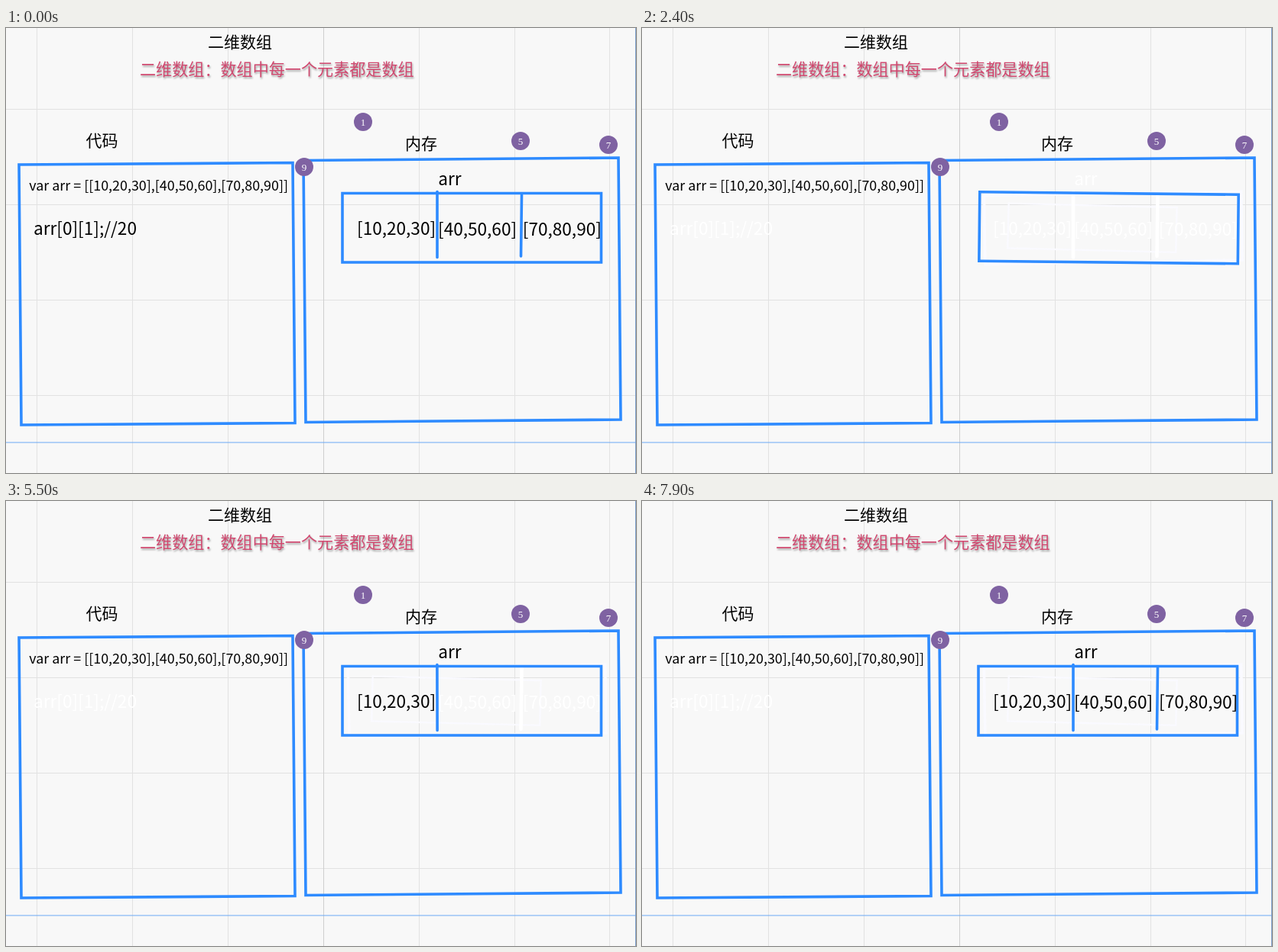
These frames come from a looping animation (824 px wide and 583 px high, 8 s). An HTML page:

```html
<!DOCTYPE html>
<html lang="zh">
<head>
<meta charset="utf-8">
<style>
html, body { margin: 0; width: 100%; height: 100%; overflow: hidden; background: #f8f8f8; }
svg { display: block; width: 824px; height: 583px; }
text { font-family: "Noto Sans CJK SC", "Noto Sans CJK", "Noto Sans", sans-serif; font-size: 21px; white-space: pre; }
.code { font-size: 22.6px; }
.small { font-size: 17.9px; }
.note { fill: #d0486f; font-size: 21.1px; filter: drop-shadow(1px 2px 1px rgba(0,0,0,.35)); }
.badge text { font: 13px "Liberation Serif", serif; fill: #fff; text-anchor: middle; }
.badge circle { fill: #7f62a2; }
.line { fill: none; stroke: #2e8bff; stroke-width: 3.6; }
.round { stroke-linecap: round; }
.blank text { fill: #fff; }
.blank .line { stroke: #fff; stroke-width: 4.6; }
#trace .line { stroke: #fafaff; }
</style>
</head>
<body>
<svg viewBox="0 0 824 583">
  <rect width="824" height="583" fill="#f8f8f8"/>
  <g id="grid" shape-rendering="crispEdges"></g>
  <path d="M0 543H824" stroke="#6aa8f4"/>
  <path d="M823.5 0V583" stroke="#7a9cc8"/>
  <text x="264" y="26">二维数组</text>
  <text class="note" x="175" y="62">二维数组：数组中每一个元素都是数组</text>
  <text x="104.5" y="155">代码</text>
  <text x="522" y="159">内存</text>
  <g id="trace"></g>
  <g id="blank" class="blank"></g>
  <path class="line" d="M17 179L375 176.5L378 517.5L20 520Z"/>
  <path class="line" d="M389 173.5L801 170L804 513L392 516.5Z"/>
  <g id="live"></g>
  <g id="badges" class="badge"></g>
</svg>
<script>
const $ = id => document.getElementById(id);
const LOOP = 8000, CLEAR = 1200, STEP = 100, SETTLE = 9;
const FIRST = 2300, GAP = 900;

function add(parent, tag, attrs, text = '') {
  const el = document.createElementNS('http://www.w3.org/2000/svg', tag);
  for (const key in attrs) el.setAttribute(key, attrs[key]);
  el.textContent = text;
  parent.append(el);
  return el;
}

const gridLine = (x, y, width, height, fill = '#e2e2e2') =>
  add($('grid'), 'rect', { x, y, width, height, fill });
for (let x = 40; x < 824; x += 124.9) gridLine(Math.round(x), 0, 1, 583);
for (let y = 106; y < 583; y += 125) gridLine(0, y, 824, 1);
gridLine(415, 0, 1, 583, '#cfcfcf');

function badge(x, y, n) {
  add($('badges'), 'circle', { cx: x, cy: y, r: 12 });
  add($('badges'), 'text', { x, y: y + 4.5 }, n);
}
badge(467, 123, 1);
badge(673, 148, 5);
badge(788, 153, 7);
badge(390, 182, 9);

// Entrances: pose by age in steps
const slide = a => ({ scale: 1, dx: -160 * .4 ** a, deg: 0 });
const wobble = (a, width) => ({
  scale: 1 - .35 * Math.exp(-4 * a),
  dx: -.06 * width * Math.cos(2.25 * a) * .55 ** a,
  deg: 1.4 * Math.cos(Math.PI * a) * .65 ** a
});

function place(el, box, { scale, dx, deg }) {
  const cx = box.x + box.width / 2, cy = box.y + box.height / 2;
  el.setAttribute('transform',
    `translate(${cx + dx} ${cy}) rotate(${deg}) scale(${scale}) translate(${-cx} ${-cy})`);
}

const label = (x, y, text, size = 'code') => ['text', { x, y, class: size }, text];
const stroke = (d, cap = '') => ['path', { d, class: 'line ' + cap }];

function part(shape, start, enter = wobble) {
  const el = add($('live'), ...shape);
  return { el, blank: add($('blank'), ...shape), box: el.getBBox(), start, enter };
}

const frame = stroke('M440 216.5H778.5V307H440Z');
const inTurn = [
  label(565.3, 205.5, 'arr'),
  label(459, 271, '[10,20,30]'),
  stroke('M564 214.5V300.5', 'round'),
  label(565, 271.5, '[40,50,60]'),
  stroke('M674.5 218.5L673.5 299', 'round'),
  label(675.8, 271.5, '[70,80,90]')
];
const parts = [
  part(label(30.3, 213, 'var arr = [[10,20,30],[40,50,60],[70,80,90]]', 'small'), 1500, slide),
  part(label(36, 271, 'arr[0][1];//20'), LOOP),
  part(frame, FIRST - STEP),
  ...inTurn.map((shape, i) => part(shape, FIRST + GAP * (i + 1)))
];

// Faint marks left by the frame's first two poses
for (const age of [0, 1]) {
  const el = add($('trace'), ...frame), box = el.getBBox();
  place(el, box, wobble(age, box.width));
}

const show = (el, on) => el.setAttribute('visibility', on ? 'visible' : 'hidden');
const rest = { scale: 1, dx: 0, deg: 0 };

function draw(t) {
  const cleared = t >= CLEAR;
  show($('trace'), t >= FIRST + STEP);
  for (const { el, blank, box, start, enter } of parts) {
    const shown = !cleared || t >= start;
    const age = Math.floor((t - start) / STEP);
    show(el, shown);
    show(blank, !shown);
    place(el, box, cleared && age >= 0 && age < SETTLE ? enter(age, box.width) : rest);
  }
}

const begin = performance.now();
function tick() {
  draw((performance.now() - begin) % LOOP);
  requestAnimationFrame(tick);
}
tick();
</script>
</body>
</html>
```
